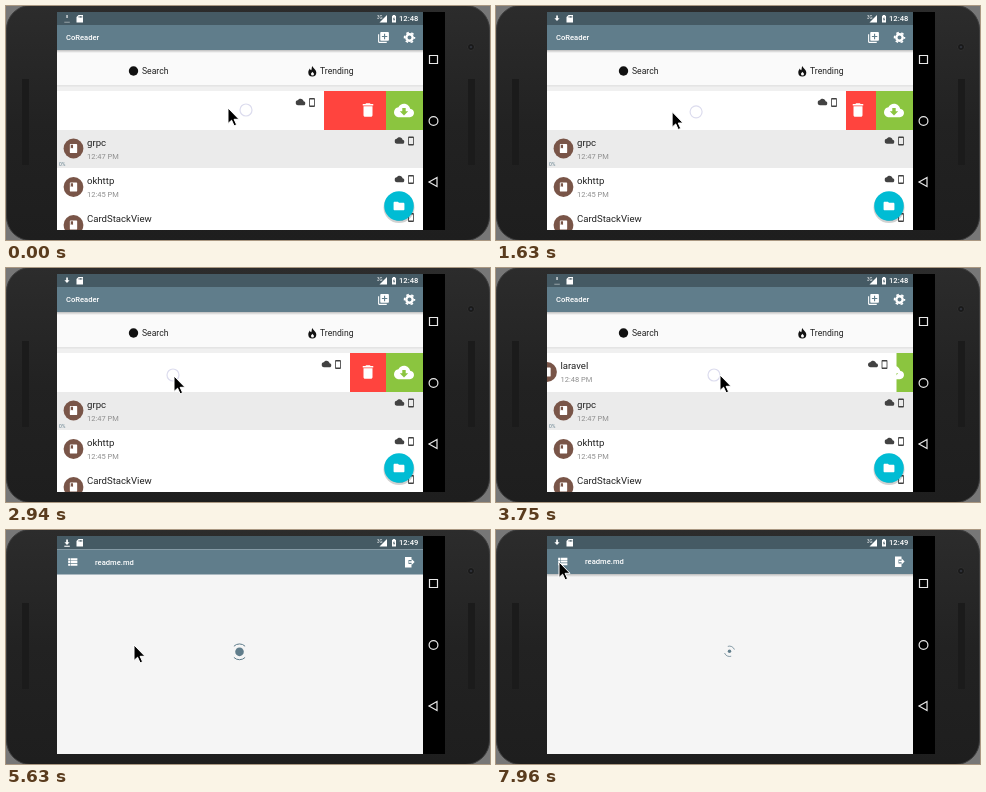
Animation, 484 px wide and 234 px high, one loop 8 s. Source, as an HTML page:

```html
<!DOCTYPE html>
<html lang="en">
<head>
<meta charset="utf-8">
<title>Swipe list</title>
<style>
html, body { margin: 0; width: 100%; height: 100%; overflow: hidden; background: #777; }
svg { display: block; width: 484px; height: 234px; font-family: Roboto, sans-serif; }
.title { font-size: 9.6px; fill: #212121; }
.time { font-size: 7.5px; fill: #8e8e8e; }
.bar { font-size: 7.6px; font-weight: 500; fill: #fff; }
.tab { font-size: 8.6px; fill: #212121; }
</style>
</head>
<body>
<svg viewBox="0 0 484 234">
  <defs>
    <clipPath id="screen"><path d="M51 6H417V224H51z"/></clipPath>
    <clipPath id="firstRow"><path d="M51 85H417V124H51z"/></clipPath>
    <pattern id="holes" width="2" height="2" patternUnits="userSpaceOnUse">
      <path d="M0 0H2V2H0z" fill="#2b2b2b"/><circle cx="1" cy="1" r=".8" fill="#050505"/>
    </pattern>
    <linearGradient id="shade" x2="0" y2="1">
      <stop stop-color="#000" stop-opacity=".24"/><stop offset="1" stop-color="#000" stop-opacity="0"/>
    </linearGradient>
    <linearGradient id="body" x2="0" y2="1">
      <stop stop-color="#2c2c2c"/><stop offset=".5" stop-color="#222"/><stop offset="1" stop-color="#1e1e1e"/>
    </linearGradient>
    <symbol id="cloud" viewBox="0 0 24 24"><path d="M19.35 10.04C18.67 6.59 15.64 4 12 4 9.11 4 6.6 5.64 5.35 8.04 2.34 8.36 0 10.91 0 14c0 3.31 2.69 6 6 6h13c2.76 0 5-2.24 5-5 0-2.64-2.05-4.78-4.65-4.96z"/></symbol>
    <symbol id="phone" viewBox="0 0 24 24"><path d="M17 1H7C5.9 1 5 1.9 5 3v18c0 1.1.9 2 2 2h10c1.1 0 2-.9 2-2V3c0-1.1-.9-2-2-2zm0 18H7V5h10z"/></symbol>
    <symbol id="bin" viewBox="0 0 24 24"><path d="M6 19c0 1.1.9 2 2 2h8c1.1 0 2-.9 2-2V7H6zM19 4h-3.5l-1-1h-5l-1 1H5v2h14z"/></symbol>
    <symbol id="book" viewBox="0 0 24 24"><path d="M18 2H6c-1.1 0-2 .9-2 2v16c0 1.1.9 2 2 2h12c1.1 0 2-.9 2-2V4c0-1.1-.9-2-2-2zM6 4h5v8l-2.5-1.5L6 12z"/></symbol>
    <symbol id="folder" viewBox="0 0 24 24"><path d="M10 4H4c-1.1 0-2 .9-2 2v12c0 1.1.9 2 2 2h16c1.1 0 2-.9 2-2V8c0-1.1-.9-2-2-2h-8z"/></symbol>
    <symbol id="add" viewBox="0 0 24 24"><path d="M4 6H2v14c0 1.1.9 2 2 2h14v-2H4zm16-4H8c-1.1 0-2 .9-2 2v12c0 1.1.9 2 2 2h12c1.1 0 2-.9 2-2V4c0-1.1-.9-2-2-2zm-1 9h-4v4h-2v-4H9V9h4V5h2v4h4z"/></symbol>
    <symbol id="list" viewBox="0 0 24 24"><path d="M4 5h4v4H4zm5 0h12v4H9zM4 10h4v4H4zm5 0h12v4H9zM4 15h4v4H4zm5 0h12v4H9z"/></symbol>
  </defs>

  <!-- Phone -->
  <rect x=".5" y="-.5" width="483" height="235" rx="24" fill="url(#body)" stroke="#3d3d3d"/>
  <path d="M16 73h7v86h-7zM462 73h7v86h-7z" fill="url(#holes)"/>
  <circle cx="465" cy="41" r="3.5" fill="#191919" stroke="#303030"/>
  <circle cx="465" cy="41" r="1.3" fill="#2d3038"/>
  <path d="M417 6h22v218h-22z"/>
  <g fill="none" stroke="#e8e8e8" stroke-width="1.2">
    <path d="M423.5 49.5h8v8h-8zM423 176l8-4.5v9z"/><circle cx="427.500" cy="115" r="4.400"/>
  </g>

  <g clip-path="url(#screen)">
    <g id="home">
      <path d="M51 6h366v218H51z" fill="#fff"/>
      <path d="M51 44h366v35H51z" fill="#fafafa"/>
      <path d="M51 79h366v6H51z" fill="#f0f0f0"/>
      <path d="M51 79h366v1.500H51z" fill="#e4e4e4"/>
      <circle cx="127.500" cy="65" r="4.700" fill="#111"/>
      <text class="tab" x="136" y="68">Search</text>
      <path d="M306.500 60c.3 2 3.800 3.600 3.800 6.400a4 4 0 0 1-8 0c0-1.800 1-2.700 1.600-3.800.3 1 .7 1.500 1.300 1.700.8-1.200.2-3 1.300-4.300zm0 5.800c-.9 1-1.500 1.600-1.500 2.300a1.500 1.500 0 0 0 3 0c0-.9-.9-1.300-1.500-2.300z" fill="#111" fill-rule="evenodd"/>
      <text class="tab" x="314" y="68">Trending</text>
      <g id="rows"></g>
      <g clip-path="url(#firstRow)">
        <path d="M51 85h329v39H51z" fill="#ff443e"/>
        <path d="M380 85h37v39h-37z" fill="#8bc53f"/>
        <use href="#bin" x="353" y="95" width="18" height="18" fill="#fff"/>
        <use href="#cloud" x="388" y="94.500" width="20" height="20" fill="#fff"/>
        <path d="M398 109.500l-4.200-4.200h2.500V102h3.400v3.300h2.500z" fill="#8bc53f"/>
        <g id="swipe"></g>
      </g>
      <text x="53" y="160" font-size="5" fill="#607d8b">0%</text>
      <circle cx="393" cy="201.500" r="15.500" opacity=".18"/>
      <circle cx="393" cy="200" r="14.800" fill="#00bcd4"/>
      <use href="#folder" x="386.500" y="193.500" width="13" height="13" fill="#fff"/>
      <path d="M51 19h366v25H51z" fill="#607d8b"/>
      <path d="M51 44h366v3H51z" fill="url(#shade)"/>
      <text class="bar" x="60" y="34" font-weight="700">CoReader</text>
      <use href="#add" x="371" y="25" width="13" height="13" fill="#fff"/>
      <g fill="none" stroke="#fff">
        <circle cx="403.500" cy="31.500" r="3.200" stroke-width="2.400"/>
        <circle cx="403.500" cy="31.500" r="4.900" stroke-width="1.700" stroke-dasharray="2.600 2.531" stroke-dashoffset="1.300"/>
      </g>
    </g>

    <g id="reader">
      <path d="M51 19h366v205H51z" fill="#f5f5f5"/>
      <path d="M51 19h366v25H51z" fill="#607d8b"/>
      <path id="readerShade" d="M51 44h366v3H51z" fill="url(#shade)"/>
      <use href="#list" x="60" y="25" width="13" height="13" fill="#fff"/>
      <text class="bar" x="89" y="34">readme.md</text>
      <path d="M399 26.500h6.500v3h-3v4h3V37H399z" fill="#fff"/>
      <path d="M403 30.700h2.600V28.500l3 3-3 3v-2.200H403z" fill="#fff"/>
      <g transform="translate(233.500 121.300)">
        <circle id="dot" r="4.300" fill="#607d8b"/>
        <path id="arcs" d="M-5.600-5.600A8 8 0 0 1 5.600-5.600M5.600 5.600A8 8 0 0 1-5.600 5.600" fill="none" stroke="#607d8b"/>
      </g>
    </g>

    <!-- Status bar -->
    <path d="M51 6h366v13H51z" fill="#455a64"/>
    <g fill="#fff">
      <path id="stem" d="M60.300 9h1.500v3h-1.500z"/>
      <path id="arrow" d="M60.200 9.500h1.700v2.700h1.700L61 15l-2.600-2.800h1.800z"/>
      <path id="base" d="M58.300 15.700h5.500v1.100h-5.500z"/>
      <path d="M72.500 9H77v7.500h-6.500V11zm.2 1v1.700h.8V10zm1.400 0v1.700h.8V10zm1.300 0v1.700h.8V10z" fill-rule="evenodd"/>
      <text x="371" y="13" font-size="4.500">3G</text>
      <path d="M381 9v7.500h-7.500z"/>
      <path d="M386 9.800h1V9h2v.8h1v6.700h-4zm2.200 1-1.300 2.600h.9v2l1.300-2.700h-.9z" fill-rule="evenodd"/>
    </g>
    <text id="clock" class="bar" x="393" y="15.300"></text>
    <circle id="touch" r="6" fill="none" stroke="#dcdcee" stroke-width="1.200"/>
  </g>
  <path id="cursor" d="M0 0V15.500l3.600-3.300 2.500 5.600 2.500-1.100-2.500-5.400H11z" stroke="#fff" stroke-width="1"/>
</svg>

<script>
const LOOP = 8000;
const $ = id => document.getElementById(id);

const rowMarkup = (y, title, time, fill) => `
  <path d="M51 ${y}h366v39H51z" fill="${fill}"/>
  <circle cx="67.500" cy="${y + 19}" r="9.900" fill="#795548"/>
  <use href="#book" x="62" y="${y + 13.5}" width="11" height="11" fill="#fff"/>
  <text class="title" x="81" y="${y + 16.3}">${title}</text>
  <text class="time" x="81" y="${y + 29}">${time}</text>
  <use href="#cloud" x="388.500" y="${y + 6}" width="10" height="10" fill="#424242"/>
  <use href="#phone" x="400" y="${y + 6.5}" width="10" height="10" fill="#424242"/>`;

$('swipe').innerHTML = rowMarkup(85, 'laravel', '12:48 PM', '#fff');
$('rows').innerHTML =
  rowMarkup(123.5, 'grpc', '12:47 PM', '#ebebeb') +
  rowMarkup(162, 'okhttp', '12:45 PM', '#fff') +
  rowMarkup(200, 'CardStackView', '12:44 PM', '#fff');

// Each key is [time, value, ...]
const cursorKeys = [
  [0, 222, 102], [380, 105, 103], [760, 240, 103], [900, 243, 104], [1180, 105, 105],
  [1460, 235, 106], [1950, 25, 105], [2270, 25, 105], [2900, 168, 108], [3230, 168, 108],
  [3740, 224, 107], [4040, 224, 107], [4450, 128, 115], [5850, 128, 115],
  [6400, 71, 37], [6950, 71, 37], [7350, 63, 32]
];
const touchKeys = [
  [0, 240, 104], [440, 100, 104], [760, 167, 105], [860, 240, 105], [1220, 105, 105],
  [1500, 235, 106], [1970, 51, 105], [2270, 51, 105], [2920, 167, 107], [3230, 167, 107],
  [3750, 218, 107], [3860, 224, 107], [3861, 129, 115]
];
const rowKeys = [
  [0, -99], [120, -14], [460, -140], [760, -73], [870, 0], [1220, -135], [1500, -5],
  [1630, -67], [1970, -213.5], [2270, -213.5], [2940, -73], [3230, -73], [3750, -16.5], [3860, 0]
];

const clamp = x => Math.min(1, Math.max(0, x));
const smooth = x => x * x * (3 - 2 * x);

function sample(keys, t) {
  const next = keys.findIndex(key => key[0] > t);
  if (next < 0) return keys[keys.length - 1].slice(1);
  const a = keys[next - 1], b = keys[next];
  const u = smooth((t - a[0]) / (b[0] - a[0]));
  return a.slice(1).map((v, i) => v + (b[i + 1] - v) * u);
}

const move = (id, x, y) => $(id).setAttribute('transform', `translate(${x} ${y})`);
const show = (id, opacity) => $(id).setAttribute('opacity', opacity);

function drawDownload(t) {
  const p = t % 1200;
  const full = p >= 820 && p < 1065;
  const arrow = p >= 430 && p < 1065;
  show('stem', p < 430 ? 0.75 : 0);
  show('arrow', arrow ? 1 : 0);
  show('base', full ? 1 : arrow ? 0 : 0.4);
}

function drawSpinner(t) {
  const phase = t < 5660 ? 0 : (t - 5415) % 1000 / 1000;
  const turn = (1 - Math.cos(phase * Math.PI)) / 2;
  const shrink = 1 - Math.abs(1 - 2 * turn);
  $('dot').setAttribute('transform', `scale(${1 - 0.7 * shrink})`);
  $('arcs').setAttribute('transform', `rotate(${360 * turn}) scale(${1 - 0.4 * shrink})`);
}

function draw(t) {
  move('swipe', sample(rowKeys, t)[0], 0);
  move('cursor', ...sample(cursorKeys, t));
  move('touch', ...sample(touchKeys, t));
  show('touch', t < 3860 || (t >= 5200 && t < 5400) ? 1 : 0);

  const enter = clamp((t - 5420) / 220);
  show('reader', clamp(enter * 1.5));
  move('reader', 0, t < 5420 ? 0 : 18 * (1 - enter) ** 2 + (t < 5690 ? 0.5 : 0));
  show('readerShade', t < 5690 ? 0 : 1);

  $('clock').textContent = t < 5100 ? '12:48' : '12:49';
  drawDownload(t);
  drawSpinner(t);
}

const start = performance.now();
function tick() {
  draw((performance.now() - start) % LOOP);
  requestAnimationFrame(tick);
}
tick();
</script>
</body>
</html>
```
